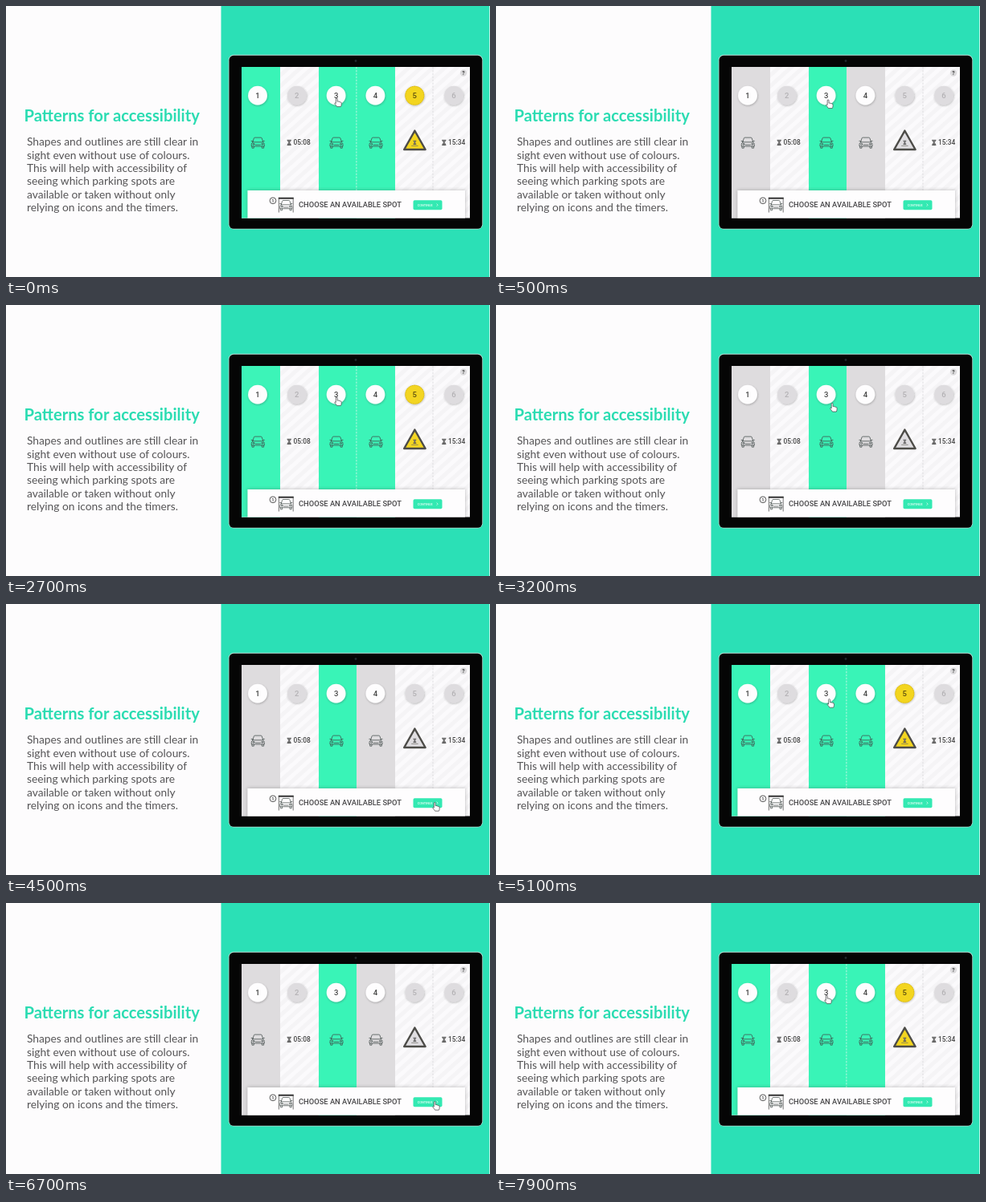
An HTML page that plays this animation: 602 by 338 pixels, repeating every 8000 ms.

```html
<!DOCTYPE html>
<html lang="en">
<head>
<meta charset="utf-8">
<title>Patterns for accessibility</title>
<style>
html, body { margin: 0; width: 100%; height: 100%; overflow: hidden; background: #fdfcfd; }
svg { display: block; width: 602px; height: 338px; }
.copy { font-family: Lato, "Open Sans", sans-serif; }
.ui { font-family: Roboto, Inter, sans-serif; }
.mid { text-anchor: middle; }
</style>
</head>
<body>
<svg viewBox="0 0 602 338" width="602" height="338">
  <defs>
    <pattern id="stripes" width="10" height="10" patternUnits="userSpaceOnUse" patternTransform="rotate(48)">
      <rect width="10" height="10" fill="#fbfafc"/>
      <rect width="5" height="10" fill="#f5f4f6"/>
    </pattern>
    <filter id="soft" x="-40%" y="-40%" width="180%" height="180%">
      <feDropShadow dx="0.5" dy="1" stdDeviation="1.1" flood-color="#333" flood-opacity=".34"/>
    </filter>
    <filter id="lift" x="-10%" y="-30%" width="120%" height="160%">
      <feDropShadow dx="0" dy="0" stdDeviation="2" flood-color="#333" flood-opacity=".35"/>
    </filter>
    <clipPath id="screen"><rect x="293" y="76" width="284" height="188.5"/></clipPath>
    <g id="car" fill="none" stroke="#414a48" stroke-width=".75" stroke-linejoin="round" stroke-linecap="round">
      <path d="M-6.4-.8 L-5-5.6 Q-4.7-6.5-3.7-6.5 H3.7 Q4.7-6.5 5-5.6 L6.4-.8"/>
      <path d="M-6.4-.8 H6.4 Q8 .2 8 1.8 V4.4 H-8 V1.8 Q-8 .2-6.4-.8Z"/>
      <path d="M-7.3 4.5 V6.6 H-5 V4.5 M7.3 4.5 V6.6 H5 V4.5 M-3 2.6 H3 M-6.4-2.2 H-8.1 M6.4-2.2 H8.1"/>
      <circle cx="-5.4" cy="1.7" r="1"/><circle cx="5.4" cy="1.7" r="1"/>
    </g>
    <g id="glass" fill="none" stroke="#444" stroke-width=".9">
      <path d="M-2.6-3 H2.6 M-2.6 3 H2.6"/>
      <path d="M-1.8-3 C-1.8-.8-.5-.7-.5 0 C-.5.7-1.8.8-1.8 3 H1.8 C1.8.8.5.7.5 0 C.5-.7 1.8-.8 1.8-3" fill="#777" stroke-width=".6"/>
    </g>
  </defs>

  <rect width="602" height="338" fill="#fdfcfd"/>
  <rect x="267.5" width="333.8" height="338" fill="#2be0b6"/>

  <g class="copy">
    <text x="22.5" y="144" font-size="20.2" font-weight="700" fill="#2bdcb2">Patterns for accessibility</text>
    <g id="body" font-size="13.75" fill="#555456"></g>
  </g>

  <rect x="276.7" y="60.8" width="316.4" height="217.7" rx="6.5" fill="#b9e0d6"/>
  <rect x="277.5" y="61.8" width="314.8" height="216" rx="5.5" fill="#050505"/>
  <circle cx="435" cy="68.5" r="1.4" fill="#20282c"/>

  <g clip-path="url(#screen)" class="ui">
    <rect x="293" y="75" width="284" height="190" fill="url(#stripes)"/>
    <g id="idle"></g>
    <g id="live">
      <g id="open"></g>
      <path d="M435.9 76 V230" stroke="#d8f8ec" stroke-width=".8" stroke-dasharray="2.4 1.5"/>
      <circle cx="508.3" cy="111.7" r="12" fill="#f3d51f"/>
      <circle cx="508.3" cy="111.7" r="11.5" fill="none" stroke="#c9a91b" stroke-width=".9" stroke-dasharray="1.2 1.2"/>
      <text class="mid" x="508.3" y="115.1" font-size="9.5" font-weight="500" fill="#5d500f">5</text>
      <path d="M508.4 156 L521.5 179 H495.3Z" fill="#f3d51f"/>
    </g>
    <path d="M531 76 V230" stroke="#d3d2d4" stroke-width=".7" stroke-dasharray="2.4 1.5"/>
    <g id="marks"></g>

    <path d="M508.4 155.6 L521.6 179 H495.2Z" fill="none" stroke="#4d4c48" stroke-width="2.4" stroke-linejoin="round"/>
    <use href="#glass" transform="translate(508.4 170.3) scale(.72)"/>
    <path d="M504.2 174.4 H512.6" stroke="#6a6964" stroke-width=".7"/>

    <circle cx="569" cy="83.5" r="4.2" fill="#dddcde"/>
    <text class="mid" x="569" y="86" font-size="6.8" font-weight="700" fill="#444">?</text>

    <rect x="300.5" y="230" width="270.5" height="40" fill="#fefdfe" filter="url(#lift)"/>
    <circle cx="332" cy="242.8" r="3.9" fill="none" stroke="#444" stroke-width=".9"/>
    <text class="mid" x="332" y="245" font-size="5.8" font-weight="500" fill="#333">1</text>
    <path d="M338.8 239.8 H357.8" stroke="#333" stroke-width="2"/>
    <path d="M339.4 240 V257.5 M357.2 240 V257.5" stroke="#555" stroke-width=".8"/>
    <use href="#car" transform="translate(348.3 248.6) scale(.94)"/>
    <text x="364" y="251.2" font-size="9.35" font-weight="500" fill="#464547">CHOOSE AN AVAILABLE SPOT</text>
    <rect x="506.5" y="242.2" width="36" height="12" rx="1.8" fill="#33e9b2"/>
    <text x="511.8" y="249.7" font-size="3.9" font-weight="500" fill="#e9fff8">CONTINUE</text>
    <path d="M535.6 246.6 L537.2 248.2 L535.6 249.8" fill="none" stroke="#effff9" stroke-width=".7"/>

    <path id="hand" d="M-.9.8 Q-.9-.3 0-.3 Q1 -.3 1 .8 V4 Q2.4 3.2 2.8 4.3 Q4.2 3.7 4.5 4.8 Q6 4.4 6 6 V7.6 Q6 9 5.2 10.4 H.4 Q-.6 8.6-2.2 7 Q-2.8 5.8-1.6 5.7 L-.9 6.3Z"
      fill="#fff" stroke="#4a4a4c" stroke-width=".75" stroke-linejoin="round"/>
  </g>
</svg>

<script>
const $ = id => document.getElementById(id);
const CYCLE = 2650, LOOP = 8000;

const lines = [
  "Shapes and outlines are still clear in",
  "sight even without use of colours.",
  "This will help with accessibility of",
  "seeing which parking spots are",
  "available or taken without only",
  "relying on icons and the timers."
];
$("body").innerHTML = lines.map((s, i) =>
  `<text x="26" y="${174.2 + i * 16.35}">${s}</text>`).join("");

const edge = i => Math.round(293.4 + i * 47.6);
const lane = (i, fill) =>
  `<rect x="${edge(i)}" y="75" width="${edge(i + 1) - edge(i)}" height="190" fill="${fill}"/>`;
const disc = (i, fill, ink) => {
  const x = 313 + i * 48.8;
  return `<circle cx="${x}" cy="111.7" r="11.9" fill="${fill}" filter="url(#soft)"/>
    <text class="mid" x="${x}" y="115.1" font-size="9.5" font-weight="500" fill="${ink}">${i + 1}</text>`;
};
const timer = (x, time) =>
  `<use href="#glass" x="${x}" y="170.3"/>
   <text x="${x + 5.3}" y="173.3" font-size="8.4" font-weight="500" fill="#444">${time}</text>`;

const GREEN = "#39f4b7", GREY = "#dedcde";
$("idle").innerHTML = lane(0, GREY) + lane(2, GREEN) + lane(3, GREY)
  + disc(4, "#dedcdf", "#b3b1b4")
  + '<path d="M508.4 156 L521.5 179 H495.3Z" fill="#e0dee1"/>';
$("open").innerHTML = lane(0, GREEN) + lane(3, GREEN);
$("marks").innerHTML = [0, 2, 3].map(i => disc(i, "#fefdfe", "#444")).join("")
  + [1, 5].map(i => disc(i, "#dedcdf", "#b3b1b4")).join("")
  + [313.3, 411, 460].map(x => `<use href="#car" x="${x}" y="170.6"/>`).join("")
  + timer(352.2, "05:08") + timer(544.8, "15:34");

// Each row: time, value; eased between rows.
const fade = [[30, 1], [310, 0], [2000, 0], [2300, 1]];
const travel = [[450, 0], [1150, 1], [2000, 1], [2500, 0]];
const ease = u => u * u * (3 - 2 * u);

function at(steps, t) {
  if (t <= steps[0][0]) return steps[0][1];
  for (let i = 1; i < steps.length; i++) {
    const [a, v] = steps[i - 1], [b, w] = steps[i];
    if (t < b) return v + (w - v) * ease((t - a) / (b - a));
  }
  return steps[steps.length - 1][1];
}

function draw() {
  const t = performance.now() % LOOP % CYCLE;
  const go = at(travel, t);
  $("live").setAttribute("opacity", at(fade, t));
  $("hand").setAttribute("transform", `translate(${411.2 + 122 * go} ${115.2 + 132.6 * go})`);
  requestAnimationFrame(draw);
}
draw();
</script>
</body>
</html>
```
